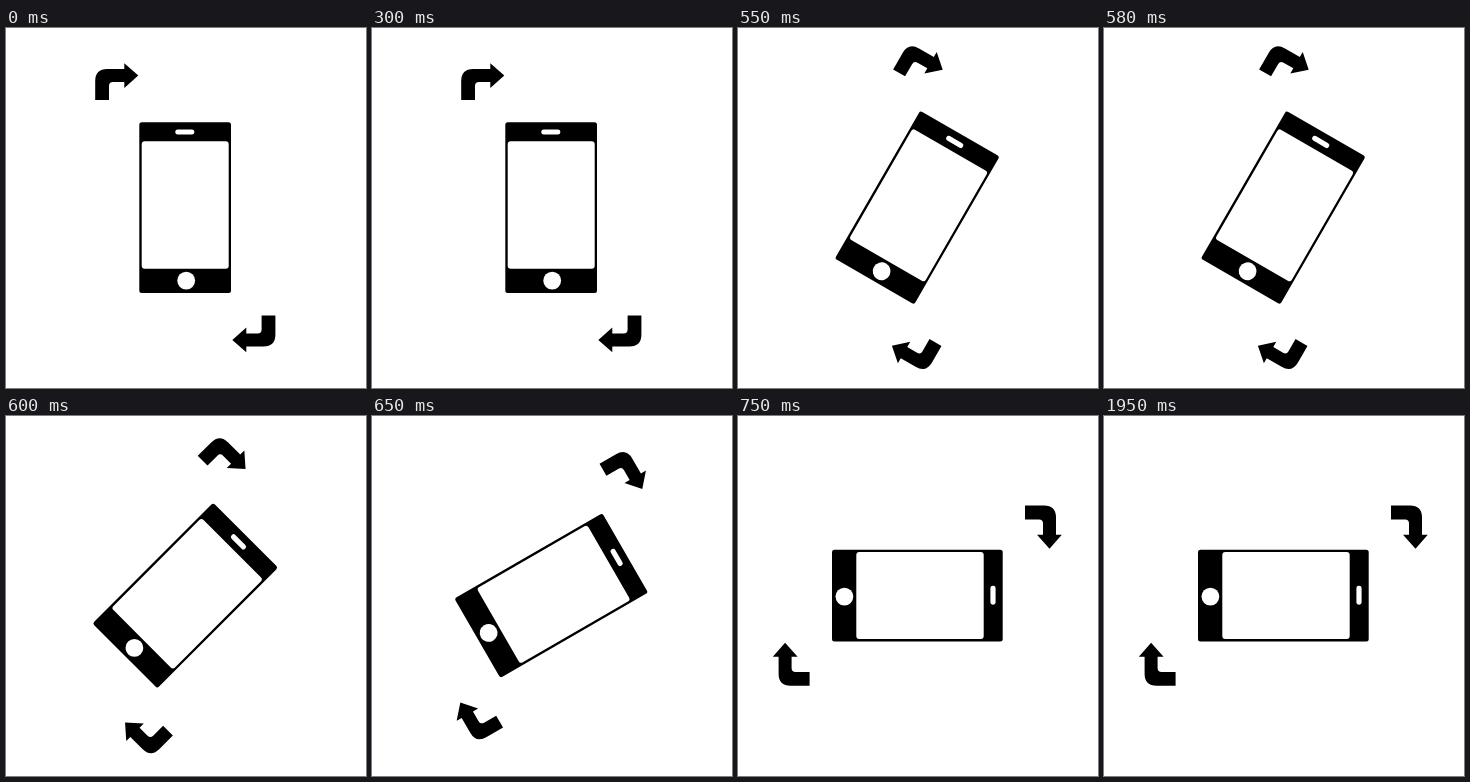
An HTML page that plays this animation: 360x360 px, repeating every 2.75 s.

```html
<!DOCTYPE html>
<html>
<head>
<meta charset="utf-8">
<style>
  html, body { margin: 0; height: 100%; overflow: hidden; background: #fff; }
  svg { display: block; width: 100vw; height: 100vh; }
</style>
</head>
<body>
<svg viewBox="0 0 360 360">
  <g id="scene">
    <rect x="133.3" y="94.3" width="91.7" height="170.7" rx="2.5"/>
    <g fill="#fff">
      <rect x="135.7" y="113.3" width="87" height="127.4" rx="3"/>
      <rect x="169.3" y="101.4" width="19" height="5.2" rx="2.4"/>
      <circle cx="180.2" cy="252.6" r="8.9"/>
    </g>
    <path id="arrow" d="M89.2 72V53Q89.2 41 101.2 41H118.3V35.2L132.3 47.5L118.3 60V54H107Q103 54 103 58V72Z"/>
    <use href="#arrow" transform="rotate(180 179.3 179.7)"/>
  </g>
</svg>
<script>
  const LOOP = 2750, TURN_START = 500, STEP_TIME = 50, STEP_ANGLE = 15, STEPS = 6;
  const scene = document.getElementById('scene');

  function draw() {
    const t = performance.now() % LOOP;
    const step = Math.floor((t - TURN_START) / STEP_TIME) + 1;
    const angle = STEP_ANGLE * Math.max(0, Math.min(STEPS, step));
    scene.setAttribute('transform', `rotate(${angle} 179.3 179.7)`);
    requestAnimationFrame(draw);
  }
  draw();
</script>
</body>
</html>
```
